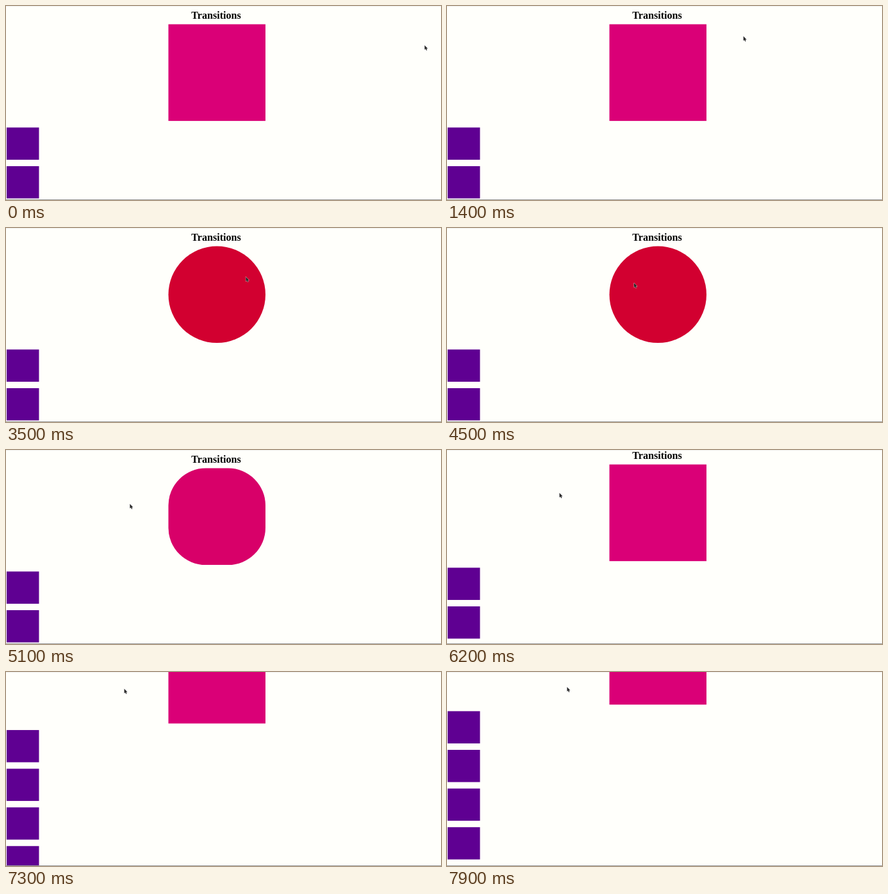
Animation, 679 px wide and 304 px high, one loop 8 s. Source, as an HTML page:

```html
<!DOCTYPE html>
<html lang="en">
<head>
<meta charset="utf-8">
<title>Transitions</title>
<style>
  html, body { margin: 0; width: 100%; height: 100%; overflow: hidden; background: #fffffb; }
  svg { display: block; }
  text { font: bold 16.1px "Liberation Serif", "Times New Roman", serif; text-anchor: middle; }
</style>
</head>
<body>
<svg width="679" height="304" viewBox="0 0 679 304">
  <rect width="679" height="304" fill="#fffffb"/>
  <path d="M0 .5H679" stroke="#f1f1ef"/>
  <g id="page">
    <text x="328" y="20">Transitions</text>
    <rect id="box" x="253.5" y="28.6" width="151.5" height="151.5"/>
    <g id="squares" fill="#5f0092"></g>
  </g>
  <path d="M0 303.5H679" stroke="#999"/>
  <path id="cursor" d="M.4 .4V7.6L2 6.2L3.1 8.7L4.3 8.1L3.3 5.7H5.4Z"
        fill="#2a2a2a" stroke="#fff" stroke-width=".6" paint-order="stroke"/>
</svg>
<script>
const LOOP = 8000, STEP = 100;
const ENTER = 1695, LEAVE = 4600;
const REST = [218, 0, 119], HOVER = [210, 0, 48];
const SCROLL = { start: 6130, speed: .085, max: 129 };

// Eased cursor moves; bend bows the path sideways
const HOME = [653, 61];
const glides = [
  { start: 400, end: 2000, to: [374, 76], bend: [0, -29] },
  { start: 4100, end: 4950, to: [193, 84], bend: [0, 6] },
  { start: 5460, end: 7580, to: [187, 23], bend: [-21, 0] }
];

const $ = id => document.getElementById(id);
const clamp = (v, max = 1) => Math.min(max, Math.max(0, v));
const mix = (a, b, p) => a + (b - a) * p;
const smooth = p => p * p * (3 - 2 * p);

function cursorAt(t) {
  return glides.reduce((from, { start, end, to, bend }) => {
    const p = smooth(clamp((t - start) / (end - start)));
    return from.map((v, k) => mix(v, to[k], p) + bend[k] * Math.sin(Math.PI * p));
  }, HOME);
}

function cubicBezier(x1, y1, x2, y2) {
  const curve = (a, b, s) => 3 * a * s * (1 - s) ** 2 + 3 * b * s * s * (1 - s) + s ** 3;
  return x => {
    if (x <= 0 || x >= 1) return clamp(x);
    let low = 0, high = 1;
    for (let i = 0; i < 24; i++) {
      const mid = (low + high) / 2;
      if (curve(x1, x2, mid) < x) low = mid; else high = mid;
    }
    return curve(y1, y2, low);
  };
}
const ease = cubicBezier(.25, .1, .25, 1);
const easeInOut = cubicBezier(.42, 0, .58, 1);

// Hover transition: forward after entering, back after leaving
const hover = (t, duration, easing) =>
  easing(clamp((t - ENTER) / duration)) - easing(clamp((t - LEAVE) / duration));

for (let i = 0; i < 5; i++) {
  $("squares").insertAdjacentHTML("beforeend",
    `<rect x="1" y="${190.4 + i * 60.6}" width="50.5" height="50.5"/>`);
}

function draw(now) {
  const t = Math.floor(now % LOOP / STEP) * STEP;
  const tint = hover(t, 1000, ease);
  const scroll = clamp((t - SCROLL.start) * SCROLL.speed, SCROLL.max);
  $("box").setAttribute("rx", 75.75 * hover(t, 1500, easeInOut));
  $("box").setAttribute("fill", `rgb(${REST.map((c, i) => Math.round(mix(c, HOVER[i], tint)))})`);
  $("page").setAttribute("transform", `translate(0 ${-scroll})`);
  $("cursor").setAttribute("transform", `translate(${cursorAt(t)})`);
}

const start = performance.now();
function tick() {
  draw(performance.now() - start);
  requestAnimationFrame(tick);
}
tick();
</script>
</body>
</html>
```
